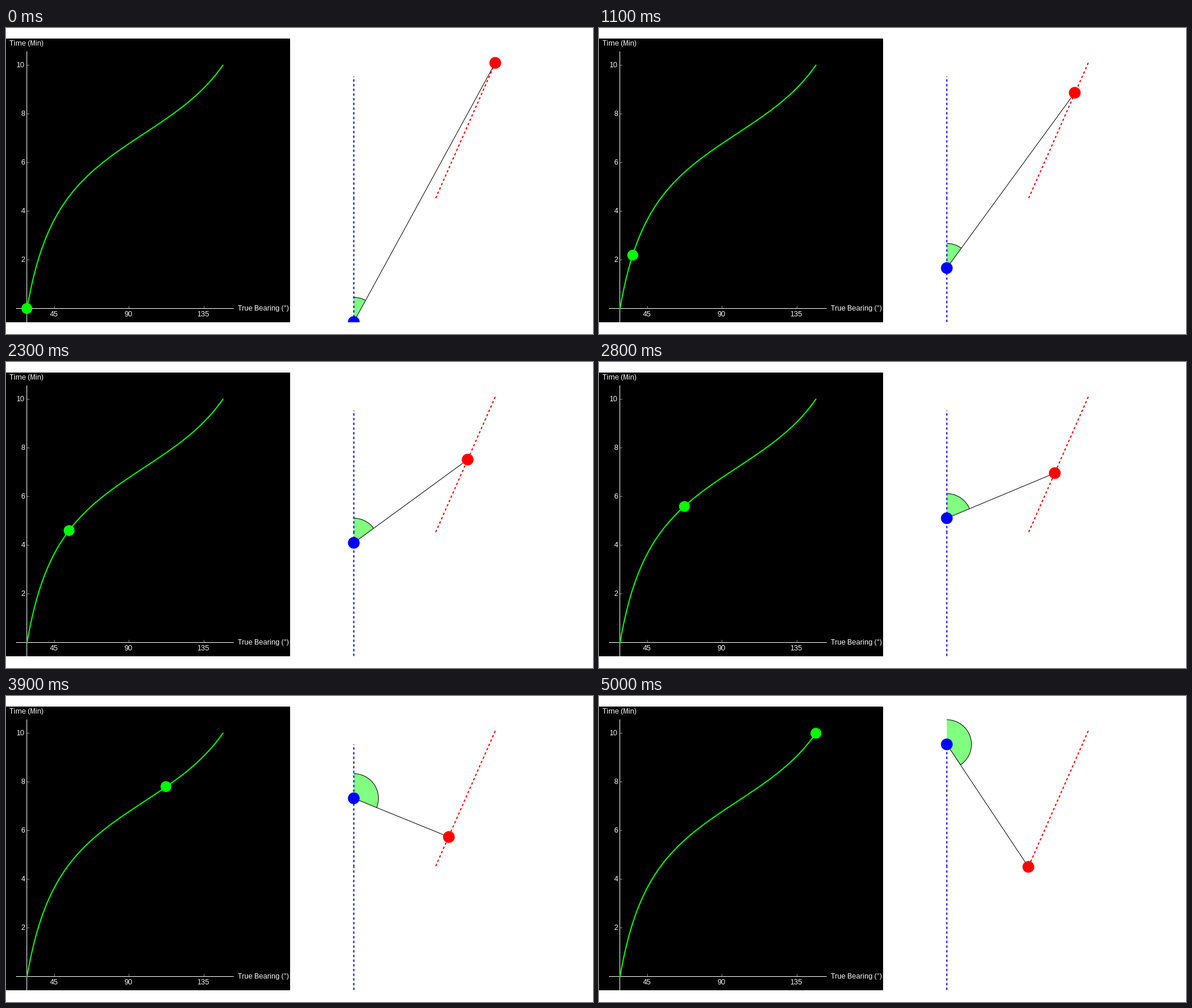
Animation of 1000 by 522 pixels, one loop 5.1 s. Source, as a matplotlib script:

```python
import numpy as np
import matplotlib.pyplot as plt
from matplotlib.animation import FuncAnimation
from matplotlib.patches import Circle, Polygon, Rectangle

W, H, DPI = 1000, 522, 100
PX = 72 / DPI                      # points per pixel
FRAMES, MINUTES = 51, 10
OWN_START, OWN_END = np.array([592.3, 501.3]), np.array([592.3, 82.3])
TARGET_START, TARGET_END = np.array([833.3, 59.6]), np.array([731.8, 291.85])
ARC_RADIUS = 42
LIME = "#00ff00"

plt.rcParams["font.family"] = "Liberation Sans"
# Whole-pixel glyph advances without kerning
plt.rcParams["text.hinting"] = "native"
plt.rcParams["text.hinting_factor"] = 1
plt.rcParams["text.kerning_factor"] = 6

fig = plt.figure(figsize=(W / DPI, H / DPI), dpi=DPI, facecolor="white")
ax = fig.add_axes([0, 0, 1, 1])
ax.set_xlim(0, W)
ax.set_ylim(H, 0)
ax.axis("off")
view = Rectangle((484, 18), 516, 484, transform=ax.transData)


def pixel_center(point):
    return np.floor(point) + 0.5


def line(p, q, color, width=1, z=2, **style):
    return ax.plot([p[0], q[0]], [p[1], q[1]], color=color, lw=width * PX,
                   zorder=z, solid_capstyle="butt", snap=False, **style)[0]


def dashed(p, q, color):
    stroke = line(pixel_center(p), pixel_center(q), color, 2, z=4, ls=(0, (2, 2)))
    stroke.set_clip_path(view)


def label(x, baseline, text, align="left"):
    ax.text(x, baseline, text, color="white", fontsize=12 * PX, ha=align,
            va="baseline", zorder=3)


def dot(radius, color):
    return ax.add_patch(Circle((0, 0), radius, fc=color, lw=0, zorder=6))


def positions(minute):
    s = minute / MINUTES
    return (OWN_START + s * (OWN_END - OWN_START),
            TARGET_START + s * (TARGET_END - TARGET_START))


def true_bearing(minute):
    own, target = positions(minute)
    dx, dy = target - own
    return np.degrees(np.arctan2(dx, -dy))


def plot_x(bearing):
    return 209.8 + (bearing - 90) * 127.5 / 45


def plot_y(minute):
    return 478.5 - 41.5 * minute


# Bearing plot
ax.add_patch(Rectangle((0, 18), 484, 484, fc="black", lw=0, zorder=1))
line((35.5, 40), (35.5, 502), "white")
line((17, 478.5), (388, 478.5), "white")
for minute in range(2, 11, 2):
    y = pixel_center(plot_y(minute))
    line((36, y), (40, y), "#808080")
    label(32.3, y + 3.5, str(minute), "right")
for bearing in (45, 90, 135):
    x = pixel_center(plot_x(bearing))
    line((x, 474), (x, 478), "#808080")
    label(x - 1, 492, str(bearing), "center")
label(6, 30, "Time (Min)")
label(395, 482, "True Bearing (°)")
times = np.linspace(0, MINUTES, 201)
ax.plot([plot_x(true_bearing(t)) for t in times], plot_y(times),
        color=LIME, lw=2 * PX, zorder=4)

# Map view
middle = (OWN_START + OWN_END) / 2
dashed(OWN_START, middle, "blue")
dashed(middle, OWN_END, "blue")
dashed(TARGET_START, TARGET_END, "red")
sector = ax.add_patch(Polygon(np.zeros((3, 2)), fc="#80ff80", lw=0, zorder=3))
arc = line((0, 0), (0, 0), "black", z=5)
sight = line((0, 0), (0, 0), "black", z=5)
plot_dot = dot(9.25, LIME)
own_dot = dot(10, "blue")
target_dot = dot(10, "red")
for artist in (sector, arc, sight, own_dot, target_dot):
    artist.set_clip_path(view)


def update(frame):
    minute = frame * MINUTES / (FRAMES - 1)
    own, target = map(pixel_center, positions(minute))
    bearing = true_bearing(minute)
    angles = np.radians(np.linspace(0, bearing, 60))
    rim = own + ARC_RADIUS * np.column_stack([np.sin(angles), -np.cos(angles)])
    sector.set_xy(np.vstack([own, rim]))
    arc.set_data(*rim.T)
    sight.set_data(*np.array([own, target]).T)
    own_dot.center = own
    target_dot.center = target
    plot_dot.center = pixel_center(np.array([plot_x(bearing), plot_y(minute)]))
    return sector, arc, sight, plot_dot, own_dot, target_dot


anim = FuncAnimation(fig, update, frames=FRAMES, interval=100, repeat=True)
plt.show()
```
